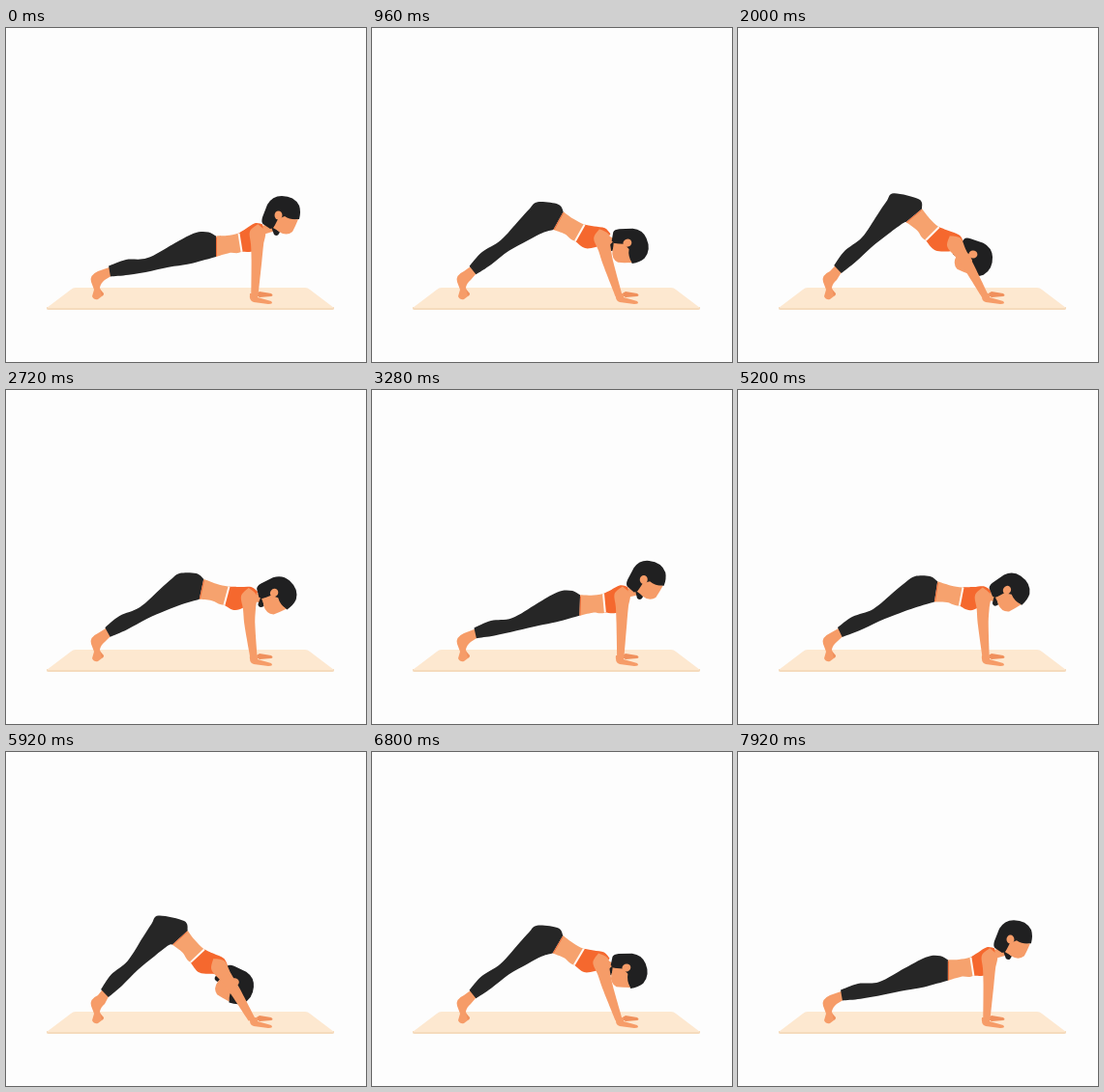
An HTML page for the animation above (8 s loop, 372 by 346 pixels).

```html
<!DOCTYPE html>
<html lang="en">
<head>
<meta charset="utf-8">
<title>Plank to downward dog</title>
<style>
  html, body { margin: 0; width: 100%; height: 100%; overflow: hidden; background: #fdfdfd; }
  svg { display: block; width: 100%; height: 100%; }
  .skin { fill: #f69c68; }
  .belly { fill: #f6a26e; }
  .shade { fill: #f0905c; }
  .top { fill: #f5682e; }
  .pants { fill: #262626; }
  .hair { fill: #202021; }
</style>
</head>
<body>
<svg viewBox="0 0 372 346">
  <path fill="#f5dbbd" d="M42 289H339V290.5Q339 292 337 292H44Q42 292 42 290.5Z"/>
  <path fill="#fde8d0" d="M72 269H309Q312 269 314 271L339 290H42L67 271Q69 269 72 269Z"/>
  <path class="shade" d="M96 269L101 275Q101 278 98 278L94 277Z"/>
  <path class="skin" id="foot"/>
  <path class="shade" d="M257 276L262 273L274 275Q277 277 274 278L262 279Z"/>
  <path class="belly" id="torso"/>
  <path class="pants" id="pants"/>
  <path id="waist" stroke="#ee6b36"/>
  <path id="neck" stroke="#f69c68" stroke-width="9" stroke-linecap="round"/>
  <path class="top" id="bra"/>
  <path id="strap" stroke="#fff8f2" stroke-width="2"/>
  <g id="head">
    <path class="hair" d="M-11 14L-8 22Q-4 25 -2 19Z"/>
    <path class="hair" d="M-12 16L-19.5 11Q-21.5 9 -20 4L-15 -9Q-10 -18 0 -18Q13 -18 18 -8Q20 -2 18 6L4 8L-4 9L-9 15Z"/>
    <path class="skin" d="M-4 6L3 3Q9 7 17 6L14 13L11 19Q5 24 -3 19L-8 14Z"/>
    <ellipse class="skin" cx="-3.5" cy="2" rx="4" ry="4.5"/>
  </g>
  <path class="skin" id="arm"/>
  <path class="skin" d="M252 275Q251 283 256 284L271 286Q277 286 274 283L260 279V275Z"/>
</svg>
<script>
const LOOP = 8000, CYCLE = 4480;

// Progress from plank (0) to downward dog (1) over one cycle
const TIMES = [0, 290, 720, 1120, 1440, 1680, 2000, 2320, 2720, 3080, 3480, CYCLE];
const PROGRESS = [0, 0, 0.42, 0.9, 1, 1, 0.95, 0.76, 0.5, 0.22, 0, 0];

// Joint positions at these stages of progress
const STAGES = [0, 0.5, 0.76, 0.95, 1];
const JOINTS = {
  ankle:    { x: [107, 105, 104, 103, 102], y: [252, 251, 251, 250, 250] },
  knee:     { x: [148, 142, 137, 133, 131], y: [245, 231, 225, 222, 221] },
  hip:      { x: [204, 188, 180, 172, 169], y: [226, 203, 192, 182, 180] },
  waist:    { x: [217, 202, 192, 182, 180], y: [226, 206, 199, 194, 192] },
  chest:    { x: [242, 228, 214, 201, 198], y: [222, 213, 212, 213, 211] },
  shoulder: { x: [260, 251, 236, 223, 219], y: [211, 213, 216, 222, 221] },
  elbow:    { x: [259, 252, 244, 239, 237], y: [241, 244, 245, 248, 248] },
  wrist:    { x: [257, 256, 255, 255, 254], y: [277, 277, 277, 277, 277] },
  head:     { x: [285, 281, 266, 245, 238], y: [192, 211, 226, 238, 242] }
};
const HEAD_TURN = [0, 42, 68, 88, 95];

// Monotone cubic interpolation
function curve(xs, ys, x) {
  const last = xs.length - 1;
  const slope = i => (ys[i + 1] - ys[i]) / (xs[i + 1] - xs[i]);
  const tangent = i => {
    if (i === 0) return slope(0);
    if (i === last) return slope(last - 1);
    const a = slope(i - 1), b = slope(i);
    return a * b <= 0 ? 0 : 2 * a * b / (a + b);
  };
  let i = 0;
  while (i < last - 1 && x > xs[i + 1]) i++;
  const h = xs[i + 1] - xs[i], u = (x - xs[i]) / h, v = 1 - u;
  return v * v * (1 + 2 * u) * ys[i] + u * u * (3 - 2 * u) * ys[i + 1]
    + h * u * v * (v * tangent(i) - u * tangent(i + 1));
}

// Point at fraction u along a bone, pushed sideways by d pixels
function at(a, b, u, d) {
  const dx = b.x - a.x, dy = b.y - a.y, len = Math.hypot(dx, dy);
  return { x: a.x + dx * u + dy / len * d, y: a.y + dy * u - dx / len * d };
}

const xy = p => p.x.toFixed(2) + ' ' + p.y.toFixed(2);

// Smooth open curve through points, without the leading command
function spline(points) {
  let d = xy(points[0]);
  for (let i = 0; i < points.length - 1; i++) {
    const a = points[i], b = points[i + 1];
    const before = points[i - 1] || a, after = points[i + 2] || b;
    const c1 = { x: a.x + (b.x - before.x) / 6, y: a.y + (b.y - before.y) / 6 };
    const c2 = { x: b.x - (after.x - a.x) / 6, y: b.y - (after.y - a.y) / 6 };
    d += `C${xy(c1)} ${xy(c2)} ${xy(b)}`;
  }
  return d;
}

const shape = (...sides) => 'M' + sides.map(spline).join('L') + 'Z';
const part = id => document.getElementById(id);
const draw = (id, d) => part(id).setAttribute('d', d);

function limb(shoulder, elbow, wrist) {
  const side = s => [
    at(shoulder, elbow, 0, 8 * s), at(shoulder, elbow, 0.45, 6.5 * s),
    at(elbow, wrist, 0, 5.4 * s), at(elbow, wrist, 1, 3.6 * s)
  ];
  const cap = at(shoulder, elbow, -0.26, 0);
  return shape([cap, ...side(1)], [...side(-1).reverse(), cap]);
}

function render(time) {
  const p = curve(TIMES, PROGRESS, time % LOOP % CYCLE);
  const pose = {};
  for (const name in JOINTS) {
    const { x, y } = JOINTS[name];
    pose[name] = { x: curve(STAGES, x, p), y: curve(STAGES, y, p) };
  }
  const { ankle, knee, hip, waist, chest, shoulder, elbow, wrist, head } = pose;
  const turn = curve(STAGES, HEAD_TURN, p);

  const cuffTop = at(ankle, knee, 0.06, 4.5), cuffBottom = at(ankle, knee, 0.06, -4.5);
  draw('foot', `M${xy(cuffTop)}L95 252Q86 256 88 263L91 271L89 278Q91 282 95 281L99 278L97 269Q98 264 102 261L${xy(cuffBottom)}Z`);

  const waistTop = at(hip, waist, 1, 10.5), waistBottom = at(hip, waist, 1, -11);
  draw('pants', shape(
    [at(ankle, knee, 0, 5.5), at(ankle, knee, 0.45, 9), at(knee, hip, 0, 7),
     at(knee, hip, 0.5, 12), at(knee, hip, 0.8, 15), at(knee, hip, 1, 15.5),
     at(hip, waist, 0.4, 14.5), waistTop],
    [waistBottom, at(knee, hip, 0.72, -13), at(knee, hip, 0.4, -10),
     at(knee, hip, 0, -7), at(ankle, knee, 0.45, -7), at(ankle, knee, 0, -5.5)]
  ));
  draw('waist', `M${xy(at(hip, waist, 1.04, 9))}L${xy(at(hip, waist, 1.04, -10.5))}`);

  const strapTop = at(waist, chest, 1, 9.5), strapBottom = at(waist, chest, 1, -10);
  draw('torso', shape(
    [waistTop, at(waist, chest, 0.5, 9), strapTop, at(chest, shoulder, 1, 7)],
    [at(chest, shoulder, 1, -7), strapBottom, at(waist, chest, 0.5, -9), waistBottom]
  ));
  draw('bra', shape(
    [strapTop, at(chest, shoulder, 0.6, 9), at(chest, shoulder, 1.1, 9), at(chest, shoulder, 1.4, 4)],
    [at(chest, shoulder, 1.1, -9), at(chest, shoulder, 0.4, -15), strapBottom]
  ));
  draw('strap', `M${xy(strapTop)}L${xy(strapBottom)}`);

  const angle = turn * Math.PI / 180, cos = Math.cos(angle), sin = Math.sin(angle);
  const nape = { x: head.x - 5 * cos - 13 * sin, y: head.y - 5 * sin + 13 * cos };
  draw('neck', `M${xy(shoulder)}L${xy(nape)}`);
  part('head').setAttribute('transform', `translate(${xy(head)}) rotate(${turn.toFixed(2)})`);
  draw('arm', limb(shoulder, elbow, wrist));
}

const start = performance.now();
function tick() {
  render(performance.now() - start);
  requestAnimationFrame(tick);
}
tick();
</script>
</body>
</html>
```
